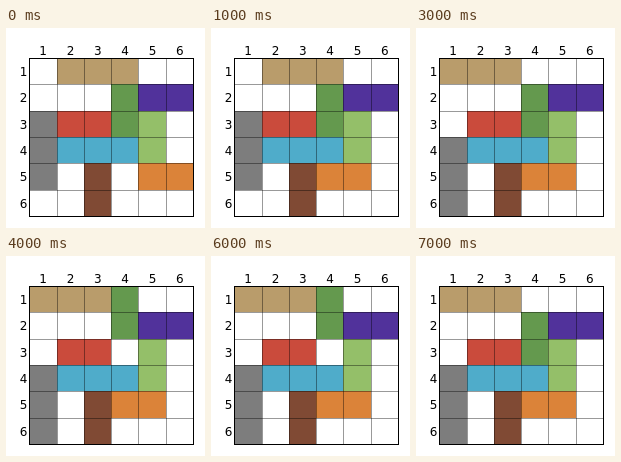
Write an HTML page with a canvas that moves like this. It is 199 px wide and 200 px high and loops after 8000 ms.

```html
<!DOCTYPE html>
<html>
<head>
<meta charset="utf-8">
<style>
html, body { margin: 0; width: 100%; height: 100%; overflow: hidden; background: #fff; }
canvas { display: block; }
</style>
</head>
<body>
<canvas id="board" width="199" height="200"></canvas>
<script>
const ctx = document.getElementById('board').getContext('2d');
const STEP = 1000, STEPS = 8;
const columnEdges = [23, 51, 78, 105, 132, 160, 187];
const rowEdges = [30, 56, 83, 109, 135, 162, 188];

// Each piece: cell position, size, and moves as [step, dx, dy].
const pieces = [
  { color: '#b99c6b', x: 1, y: 0, w: 3, h: 1, moves: [[3, -1, 0]] },
  { color: '#64994e', x: 3, y: 1, w: 1, h: 2, moves: [[4, 0, -1], [7, 0, 1]] },
  { color: '#51329b', x: 4, y: 1, w: 2, h: 1, moves: [] },
  { color: '#7d7d7d', x: 0, y: 2, w: 1, h: 3, moves: [[2, 0, 1]] },
  { color: '#ca4b3c', x: 1, y: 2, w: 2, h: 1, moves: [[5, 1, 0], [6, -1, 0]] },
  { color: '#94bf69', x: 4, y: 2, w: 1, h: 2, moves: [] },
  { color: '#4facca', x: 1, y: 3, w: 3, h: 1, moves: [] },
  { color: '#804a34', x: 2, y: 4, w: 1, h: 2, moves: [] },
  { color: '#db8339', x: 4, y: 4, w: 2, h: 1, moves: [[1, -1, 0]] }
];

function drawPiece(piece, step) {
  let { x, y, w, h } = piece;
  for (const [at, dx, dy] of piece.moves) {
    if (step >= at) { x += dx; y += dy; }
  }
  const left = columnEdges[x], top = rowEdges[y];
  ctx.fillStyle = piece.color;
  ctx.fillRect(left, top, columnEdges[x + w] - left, rowEdges[y + h] - top);
}

function drawGrid() {
  ctx.fillStyle = 'rgba(0, 0, 0, 0.4)';
  for (let i = 1; i < 6; i++) {
    ctx.fillRect(columnEdges[i], 30, 1, 158);
    ctx.fillRect(23, rowEdges[i], 164, 1);
  }
  ctx.strokeStyle = '#000';
  ctx.lineWidth = 1;
  ctx.strokeRect(23.5, 30.5, 164, 158);
}

function drawLabels() {
  ctx.fillStyle = '#000';
  ctx.font = '12px "DejaVu Sans", sans-serif';
  for (let i = 0; i < 6; i++) {
    ctx.textAlign = 'center';
    ctx.fillText(i + 1, 23.5 + (i + 0.5) * 164 / 6, 27);
    ctx.textAlign = 'right';
    ctx.fillText(i + 1, 21.5, 48 + i * 158 / 6);
  }
}

function draw(now) {
  const step = Math.floor(now / STEP) % STEPS;
  ctx.fillStyle = '#fff';
  ctx.fillRect(0, 0, 199, 200);
  for (const piece of pieces) drawPiece(piece, step);
  drawGrid();
  drawLabels();
}

function frame() {
  draw(performance.now());
  requestAnimationFrame(frame);
}
frame();
</script>
</body>
</html>
```
